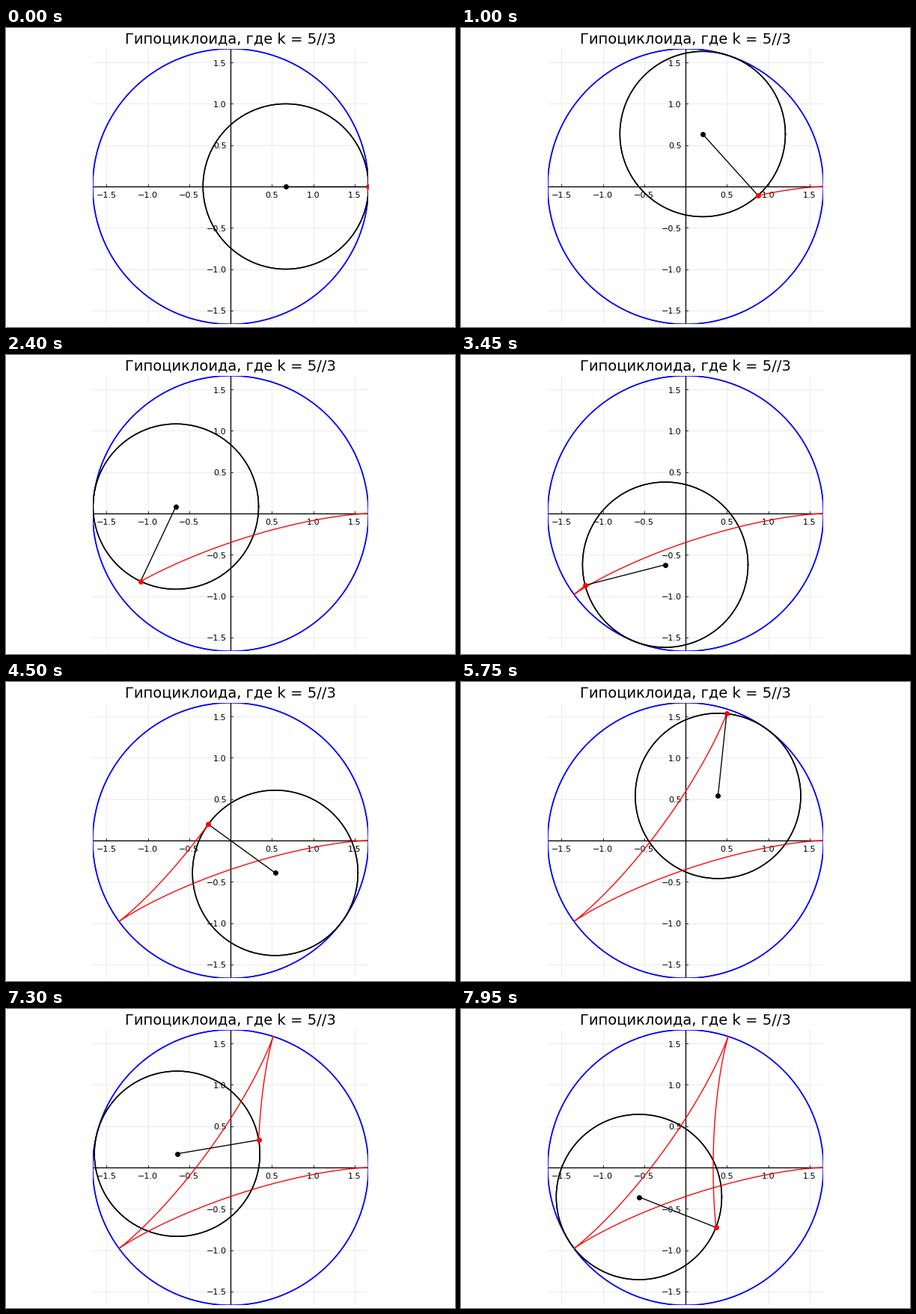
Recreate the animation shown at these times as a matplotlib script. Size 600 px wide and 400 px high, loop 8 s.

```python
import numpy as np
import matplotlib.pyplot as plt
from matplotlib.animation import FuncAnimation

W, H, DPI = 600, 400, 100
PX = 72 / DPI                      # one pixel in points
R, r = 5 / 3, 1.0
CX, CY, HALF = 300.1, 212.0, 184.3  # plot centre and half size, pixels
FRAMES, INTERVAL = 160, 50
STEP = 2 * np.pi / 100
THIN = 1.35 * PX

plt.rcParams["font.family"] = "DejaVu Sans"
fig = plt.figure(figsize=(W / DPI, H / DPI), dpi=DPI, facecolor="white")
ax = fig.add_axes([(CX - HALF) / W, 1 - (CY + HALF) / H,
                   2 * HALF / W, 2 * HALF / H])
ax.set_xlim(-R, R)
ax.set_ylim(-R, R)
ax.axis("off")
unit = HALF / R                    # pixels per data unit


def line(x, y, color, width=THIN, z=3, **kw):
    return ax.plot(x, y, color=color, lw=width, zorder=z, **kw)[0]


def dot(color, z):
    return ax.plot([], [], "o", color=color, ms=7 * PX, mew=0,
                   zorder=z, snap=False)[0]


def draw_axes():
    for v in np.arange(-1.5, 1.6, 0.5):
        if v == 0:
            continue
        line([v, v], [-R, R], "#ebebeb", PX, 0)
        line([-R, R], [v, v], "#ebebeb", PX, 0)
        line([v, v], [0, 3 / unit], "black", 0.8 * PX, 1)
        line([0, 3 / unit], [v, v], "black", 0.8 * PX, 1)
        label = f"{v:.1f}".replace("-", "\u2212")
        style = dict(fontsize=11.1 * PX, va="baseline", zorder=2)
        ax.text(v, -15 / unit, label, ha="center", **style)
        ax.text(-5.5 / unit, v - 4.5 / unit, label, ha="right", **style)
    line([-R, R], [0, 0], "black", THIN, 1)
    line([0, 0], [-R, R], "black", THIN, 1)
    fig.text(0.5, 1 - 20 / H, "Гипоциклоида, где k = 5//3",
             fontsize=19.5 * PX, ha="center", va="baseline")


def tracer(t):
    """Point of the hypocycloid at rolling angle t."""
    d = R - r
    return (d * np.cos(t) + r * np.cos(d / r * t),
            d * np.sin(t) - r * np.sin(d / r * t))


draw_axes()
turn = np.linspace(0, 2 * np.pi, 201)
cos, sin = np.cos(turn), np.sin(turn)

# Each circle is stroked twice, which firms up its edge.
for _ in range(2):
    line(R * cos, R * sin, "blue", 1.5 * PX, 3)
rolling = [line([], [], "black", 1.5 * PX, 4) for _ in range(2)]
trail = line([], [], "red", THIN, 5)
arm = line([], [], "black", THIN, 6)
hub = dot("black", 7)
pen = dot("red", 8)


def update(i):
    t = i * STEP
    cx, cy = (R - r) * np.cos(t), (R - r) * np.sin(t)
    px, py = tracer(t)
    for c in rolling:
        c.set_data(cx + r * cos, cy + r * sin)
    trail.set_data(*tracer(np.arange(i + 1) * STEP))
    arm.set_data([cx, px], [cy, py])
    hub.set_data([cx], [cy])
    pen.set_data([px], [py])
    return [*rolling, trail, arm, hub, pen]


anim = FuncAnimation(fig, update, frames=FRAMES, interval=INTERVAL,
                     init_func=lambda: update(0), repeat=True,
                     repeat_delay=0, blit=False)
plt.show()
```
